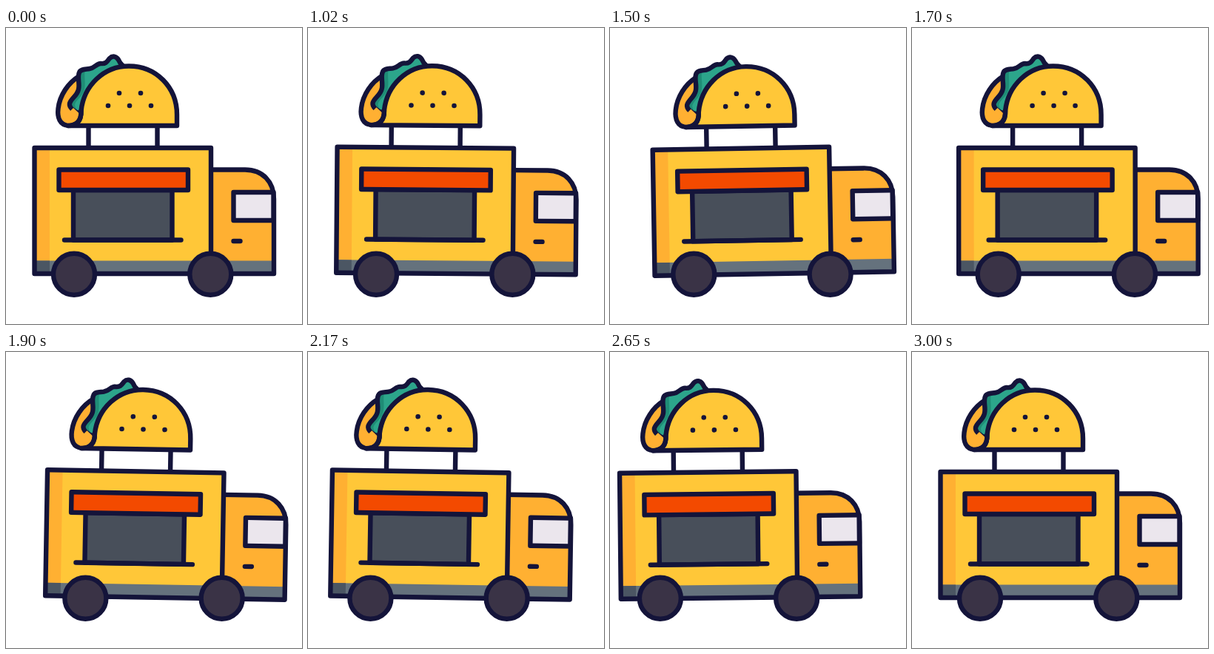
Animation of 400 by 400 pixels, one loop 3.02 s. Source, as an HTML page:

```html
<!DOCTYPE html>
<html lang="en">
<head>
<meta charset="utf-8">
<title>Taco truck</title>
<style>
  html, body { margin: 0; width: 100%; height: 100%; overflow: hidden; background: #fff; }
  svg { display: block; width: 100vw; height: 100vh; }
  .ink { stroke: #14143a; stroke-width: 6.4; stroke-linejoin: round; stroke-linecap: round; }
  .line { fill: none; }
  .yellow { fill: #ffc738; }
  .orange { fill: #ffb032; }
</style>
</head>
<body>
<svg viewBox="0 0 400 400">
  <g id="truck">
    <g id="body">
      <!-- sign posts -->
      <path class="ink line" d="M111.5 133V162M204.5 133V162"/>

      <!-- taco -->
      <path class="ink orange" d="M84 131.5C73 131.5 69 121 70.5 109C72.5 91 84 74 99 65L112 90L101 115Z"/>
      <path fill="#2ca58b" d="M99 67C98 61 100 57 106 56C114 56 119 54 125 49C130 46 134 49 138 44C142 37 149 37 152 44Q154 49 158 52L120 80L101 115C93 115 86 108 86 102C88 95 99 90 99 67Z"/>
      <path fill="#1f8c76" d="M99 67C98 61 100 57 107 56C105 66 108 72 106 83C103 94 94 97 93 104Q94 111 100 115C92 115 86 108 86 102C88 95 99 90 99 67Z"/>
      <path class="ink line" d="M100 115C92 114 85 107 86 102C88 95 96 92 98 83C100 75 96 67 99 60C101 55 108 56 113 55C120 54 122 48 128 48C135 49 137 45 140 41C144 37 149 38 152 43Q154 48 158 51"/>
      <path class="ink yellow" d="M84 132C95 132 102 126 101.500 112C105 78 132 51.500 166 51.500C203 51.500 231 80 231 117V132Z"/>
      <path class="orange" d="M85 129C94 128 98 123 98.500 115L91 108L77 122Q79 129 85 129Z"/>
      <path class="ink line" d="M84 132C95 132 102 126 101.500 112"/>
      <g id="seeds" fill="#14143a"></g>

      <!-- cab -->
      <path class="orange" d="M277 191.500H323C347 191.500 362 208 362 231V332H277Z"/>
      <path fill="#65727d" d="M277 314.500H362V332H277Z"/>
      <path class="ink line" d="M277 191.500H323C347 191.500 362 208 362 231V332H277"/>
      <path class="ink" fill="#ebe6ed" d="M307.500 222H361.500V260H307.500Z"/>
      <path class="ink line" d="M307.500 288H316.500"/>

      <!-- box -->
      <path class="yellow" d="M38.500 162H277V332H38.500Z"/>
      <path class="orange" d="M38.500 162H59V315H38.500Z"/>
      <path fill="#65727d" d="M38.500 314.500H277V332H38.500Z"/>
      <path fill="#4b5663" d="M38.500 314.500H59V332H38.500Z"/>
      <path class="ink line" d="M38.500 162H277V332H38.500Z"/>
      <path class="ink" fill="#484f5a" d="M91 219H224.500V286.500H91Z"/>
      <path class="ink" fill="#f34a00" d="M71.500 191.500H246V219H71.500Z"/>
      <path class="ink line" d="M79 286.500H236.500"/>
    </g>
    <g class="ink" fill="#3a3346">
      <circle cx="92" cy="332.800" r="28"/>
      <circle cx="276.300" cy="332.800" r="28"/>
    </g>
  </g>
</svg>
<script>
  const LOOP = 3020;
  // Drive path: [ms, x offset]
  const DRIVE = [[0, 0], [1005, 0], [1660, 25], [2545, -28], [3000, 0], [LOOP, 0]];
  const ROCK = { start: 1000, period: 280, cycles: 6, angle: 1 };

  const truck = document.getElementById('truck');
  const body = document.getElementById('body');

  document.getElementById('seeds').innerHTML =
    [[153, 88], [182, 88], [138, 105], [167, 105], [196, 105]]
      .map(([x, y]) => `<circle cx="${x}" cy="${y}" r="3.3"/>`).join('');

  const ease = u => u * u * (3 - 2 * u);

  function driveAt(t) {
    const i = DRIVE.findIndex(([time]) => time > t);
    const [t0, x0] = DRIVE[i - 1];
    const [t1, x1] = DRIVE[i];
    return x0 + (x1 - x0) * ease((t - t0) / (t1 - t0));
  }

  function rockAt(t) {
    const turns = (t - ROCK.start) / ROCK.period;
    if (turns < 0 || turns > ROCK.cycles) return 0;
    return ROCK.angle * Math.sin(2 * Math.PI * turns);
  }

  function draw() {
    const t = performance.now() % LOOP;
    truck.setAttribute('transform', `translate(${driveAt(t)} 0)`);
    body.setAttribute('transform', `rotate(${rockAt(t)} 200 290)`);
    requestAnimationFrame(draw);
  }
  draw();
</script>
</body>
</html>
```
